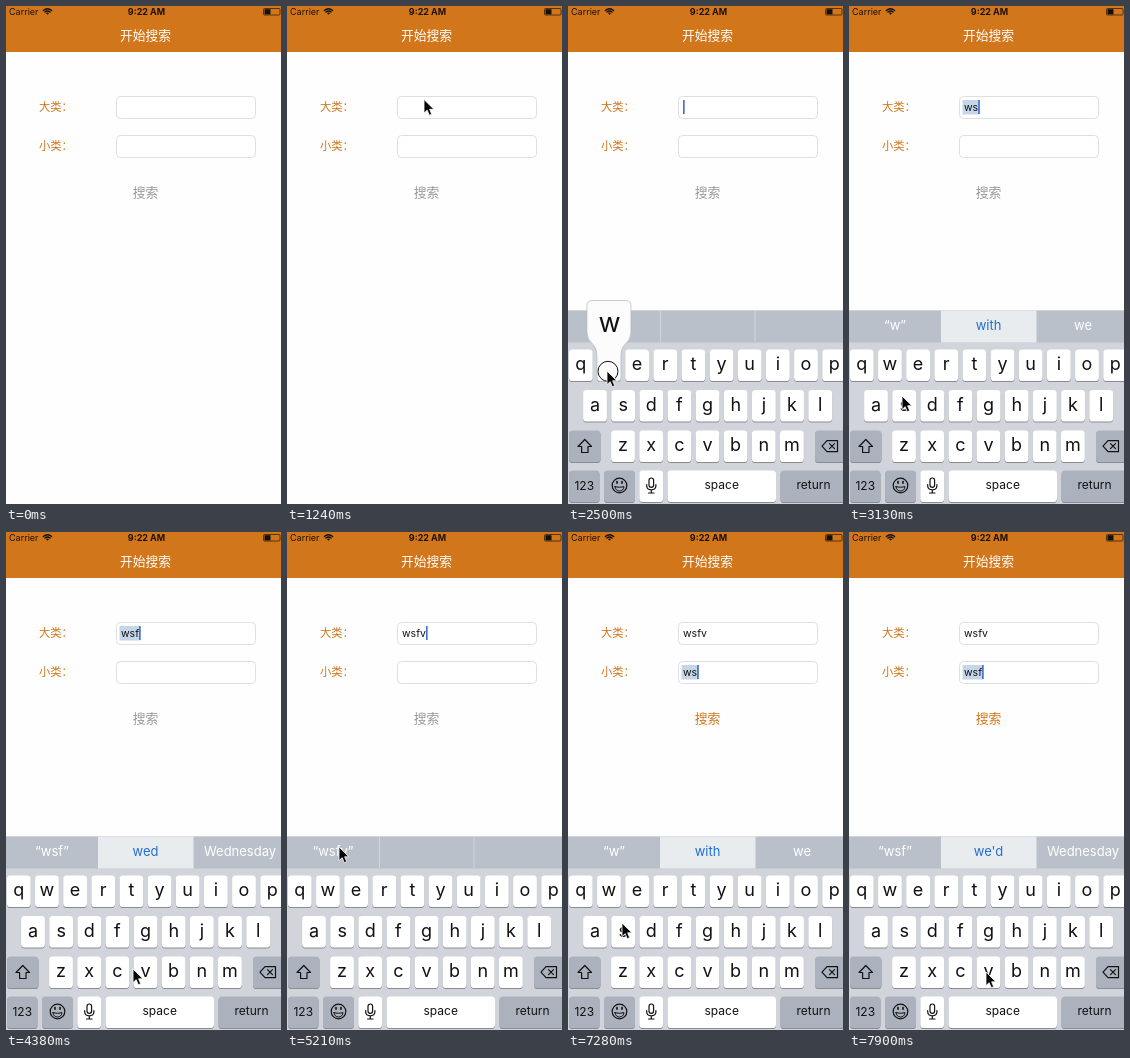
An HTML page for the animation above (8 s loop, 275x498 px).

```html
<!DOCTYPE html>
<html lang="zh-CN">
<head>
<meta charset="utf-8">
<title>Search form</title>
<style>
html, body { margin: 0; width: 100%; height: 100%; overflow: hidden; background: #fefefe; }
svg { display: block; width: 100%; height: 100%; }
text { font-family: Inter, Roboto, sans-serif; white-space: pre; }
.zh { font-family: "Noto Sans CJK SC", "Noto Sans CJK", "Noto Sans", sans-serif; }
.mid { text-anchor: middle; }
</style>
</head>
<body>
<svg id="stage" viewBox="0 0 275 498" preserveAspectRatio="none"></svg>
<script>
const LOOP = 8000, STEP = 208.1, LEAD = 12;
const ORANGE = '#d2761b', BLUE = '#2170d2', WORD = 'wsfv';
const stage = document.getElementById('stage');

function add(tag, attrs, parent = stage, content) {
  const node = document.createElementNS('http://www.w3.org/2000/svg', tag);
  set(node, attrs);
  if (content !== undefined) node.textContent = content;
  parent.appendChild(node);
  return node;
}
function set(node, attrs) {
  for (const k in attrs) node.setAttribute(k, attrs[k]);
}
function show(node, on) {
  node.setAttribute('visibility', on ? 'visible' : 'hidden');
}
function rect(x, y, width, height, fill, parent, rx = 0) {
  return add('rect', { x, y, width, height, fill, rx }, parent);
}
function label(str, x, y, size, fill, parent, more = {}) {
  return add('text', { x, y, 'font-size': size, fill, ...more }, parent, str);
}
function line(d, parent, width = 1.2, fill = 'none') {
  return add('path', { d, fill, stroke: '#111', 'stroke-width': width,
    'stroke-linecap': 'round', 'stroke-linejoin': 'round' }, parent);
}

// Header
rect(0, 0, 275, 498, '#fefefe');
rect(0, 0, 275, 46, ORANGE);
label('Carrier', 3, 8.8, 9, '#1d1208');
label('9:22 AM', 140.5, 8.8, 9, '#1d1208', stage, { class: 'mid', 'font-weight': 700 });
line('M37.3 4.6Q41.5 .9 45.7 4.6M38.9 6.1Q41.5 3.8 44.1 6.1', stage, 1.3);
add('path', { d: 'M39.9 7Q41.5 5.8 43.1 7L41.5 8.8Z', fill: '#111' });
add('rect', { x: 257.5, y: 2.5, width: 16.5, height: 6.5, rx: 1, fill: 'none', stroke: '#3a2108', 'stroke-width': .8 });
rect(258.5, 3.2, 6, 5.2, '#111');
label('开始搜索', 139.5, 33.8, 12.8, '#fff', stage, { class: 'zh mid', 'font-weight': 500 });

// Form
function makeField(name, y) {
  label(name, 33, y + 15.3, 11.3, ORANGE, stage, { class: 'zh' });
  add('rect', { x: 110.5, y: y + .5, width: 139, height: 22, rx: 4, fill: '#fff', stroke: '#dfdfdf', 'stroke-width': 1 });
  const mark = rect(113.5, y + 4, 0, 14.5, '#c5d6e8');
  const text = label('', 115, y + 14.7, 10.5, '#111');
  const caret = rect(115, y + 4, 1.7, 14, '#4a6fd6');
  return (str, focus, marked) => {
    text.textContent = str;
    const w = str ? text.getComputedTextLength() : 0;
    set(mark, { width: w + 2.5 });
    show(mark, marked && str);
    set(caret, { x: 115 + w });
    show(caret, focus);
  };
}
const drawFirst = makeField('大类：', 90);
const drawSecond = makeField('小类：', 129);
const button = label('搜索', 139.5, 190.6, 12.8, '#999', stage, { class: 'zh mid' });

// Keyboard
const board = add('g');
rect(0, 304.5, 275, 196, '#d1d5db', board);
rect(0, 304.5, 275, 32, '#b9c0c9', board);
const splits = [92, 186.5].map(x => rect(x, 305, 1, 31, '#d0d5da', board));
const glow = rect(92, 304.5, 95.5, 32, '#e9ecee', board);
const slots = [46, 139.5, 234].map(x => label('', x, 324, 13, '#fff', board, { class: 'mid' }));

function cap(x, y, w, fill = '#fff') {
  rect(x, y + 1, w, 31.5, '#898c92', board, 3.6);
  rect(x, y, w, 31.5, fill, board, 3.6);
}
const PITCH = 28.15, GRAY = '#abb2be', keys = {};
[['qwertyuiop', 12.8, 343.5], ['asdfghjkl', 27, 384], ['zxcvbnm', 55, 424.5]].forEach(([row, x0, y]) => {
  [...row].forEach((c, i) => {
    const x = x0 + i * PITCH;
    keys[c] = [x, y];
    cap(x - 11.9, y, 23.8);
    label(c, x, y + 20.8, 18, '#111', board, { class: 'mid' });
  });
});
cap(1, 424.5, 31.5, GRAY);
cap(247, 424.5, 31.5, GRAY);
cap(1, 464.5, 30.5, GRAY);
cap(36, 464.5, 31, GRAY);
cap(71.3, 464.5, 23.8);
cap(99.5, 464.5, 108.5);
cap(212.5, 464.5, 66, GRAY);
label('123', 16.3, 484.2, 12, '#111', board, { class: 'mid' });
label('space', 153.7, 483.3, 12, '#111', board, { class: 'mid' });
label('return', 245.5, 483.3, 12, '#111', board, { class: 'mid' });
line('M16.8 433.5L23.5 440.5H20V446.5H13.6V440.5H10Z', board);
line('M254 440.2L259 434.7H269.5V445.7H259ZM261.5 437.7L266.5 442.7M266.5 437.7L261.5 442.7', board);
add('circle', { cx: 51.5, cy: 479.5, r: 7.3, fill: 'none', stroke: '#111', 'stroke-width': 1.2 }, board);
line('M47 480.7Q51.5 482 56 480.7Q55.3 485 51.5 485T47 480.7Z', board, 1);
line('M49 475.6V477.3M54 475.6V477.3', board, 1.6);
add('rect', { x: 81, y: 472, width: 4.6, height: 9.4, rx: 2.3, fill: 'none', stroke: '#111', 'stroke-width': 1.2 }, board);
line('M78.7 478.5V480Q79 483.8 83.3 483.8T87.9 480V478.5M83.3 484V487M80.5 487H86', board);

// Enlarged key while pressed, drawn around the key's top centre
const bubble = add('g');
add('path', {
  d: 'M-17 -49H17Q22 -49 22 -44V-17Q22 -10 16 -5Q12 -1 12 5V28Q12 32 8 32H-8Q-12 32 -12 28V5Q-12 -1 -16 -5Q-22 -10 -22 -17V-44Q-22 -49 -17 -49Z',
  fill: '#fcfcfc', stroke: '#b2b6bb', 'stroke-width': .7
}, bubble);
const big = label('', .5, -17.5, 27, '#111', bubble, { class: 'mid' });

// Pointer
const pointer = add('g');
const ring = add('circle', { cx: 1, cy: .3, r: 10, fill: 'none', stroke: '#111', 'stroke-width': 1 }, pointer);
add('path', {
  d: 'M0 0V13.6L3.2 10.7 5.3 15.7 7.7 14.7 5.6 9.8H9.9Z',
  fill: '#050505', stroke: '#fff', 'stroke-width': .8
}, pointer);

// Timeline in steps: [step, x, y] for the pointer
const path = [
  [1, 18, 245], [2, 85, 165], [3, 137, 93.5], [8, 137, 93.5], [9, 122, 150],
  [10, 80, 270], [11, 42, 350], [12, 39, 365], [13, 39, 364], [14, 52, 391],
  [15, 53, 390], [18, 109, 391], [20, 110, 391], [21, 127, 437], [22, 138, 440],
  [23, 138, 440], [24, 95, 400], [25, 52, 315], [26, 52, 315], [27, 90, 240],
  [28, 136, 142], [29, 136, 142], [30, 120, 200], [31, 50, 340], [32, 39, 365],
  [33, 39, 365], [34, 52, 391], [35, 54, 391], [36, 109, 392], [37, 112, 402], [38, 137, 440]
];
const presses = { 5: '', 8: '', 12: 'w', 14: 's', 19: 'f', 22: 'v', 26: '', 29: '', 32: 'w', 34: 's', 36: 'f' };
const typedFirst = [13, 15, 20, 23], typedSecond = [33, 35, 37];
// [step, middle word is picked, three suggestions]
const hints = [
  [0, false, '', '', ''],
  [13, true, '“w”', 'with', 'we'],
  [20, true, '“wsf”', 'wed', 'Wednesday'],
  [23, false, '“wsfv”', '', ''],
  [27, false, '', '', ''],
  [30, false, '', 'wow', 'we'],
  [33, false, '“w”', 'wow', 'we'],
  [35, true, '“w”', 'with', 'we'],
  [37, true, '“wsf”', 'we\'d', 'Wednesday']
];

function place(n) {
  const j = path.findIndex(p => p[0] >= n);
  if (j < 1) return path[0].slice(1);
  const [a, ax, ay] = path[j - 1], [b, bx, by] = path[j];
  const k = (n - a) / (b - a);
  return [ax + (bx - ax) * k, ay + (by - ay) * k];
}
const typed = (times, n) => WORD.slice(0, times.filter(t => t <= n).length);

function draw(n) {
  const [, picked, ...words] = hints.filter(h => h[0] <= n).pop();
  const second = n >= 30;
  drawFirst(typed(typedFirst, n), n >= 8 && !second, picked && !second);
  drawSecond(typed(typedSecond, n), second, picked && second);
  set(button, { fill: n >= 33 ? ORANGE : '#999' });

  set(board, { display: n >= 8 ? 'inline' : 'none', transform: `translate(0 ${n === 8 ? 2 : 0})` });
  show(glow, picked);
  splits.forEach(s => show(s, !picked));
  slots.forEach((s, i) => {
    s.textContent = words[i];
    set(s, { fill: picked && i === 1 ? BLUE : '#fff' });
  });

  const key = presses[n];
  show(bubble, key);
  if (key) {
    set(bubble, { transform: `translate(${keys[key]})` });
    big.textContent = key;
  }
  set(pointer, { display: n ? 'inline' : 'none', transform: `translate(${place(n)})` });
  show(ring, key !== undefined);
}

let last = -1;
function tick() {
  const t = performance.now() % LOOP;
  const n = Math.min(38, Math.floor((t + LEAD) / STEP));
  if (n !== last) draw(last = n);
  requestAnimationFrame(tick);
}
tick();
</script>
</body>
</html>
```
